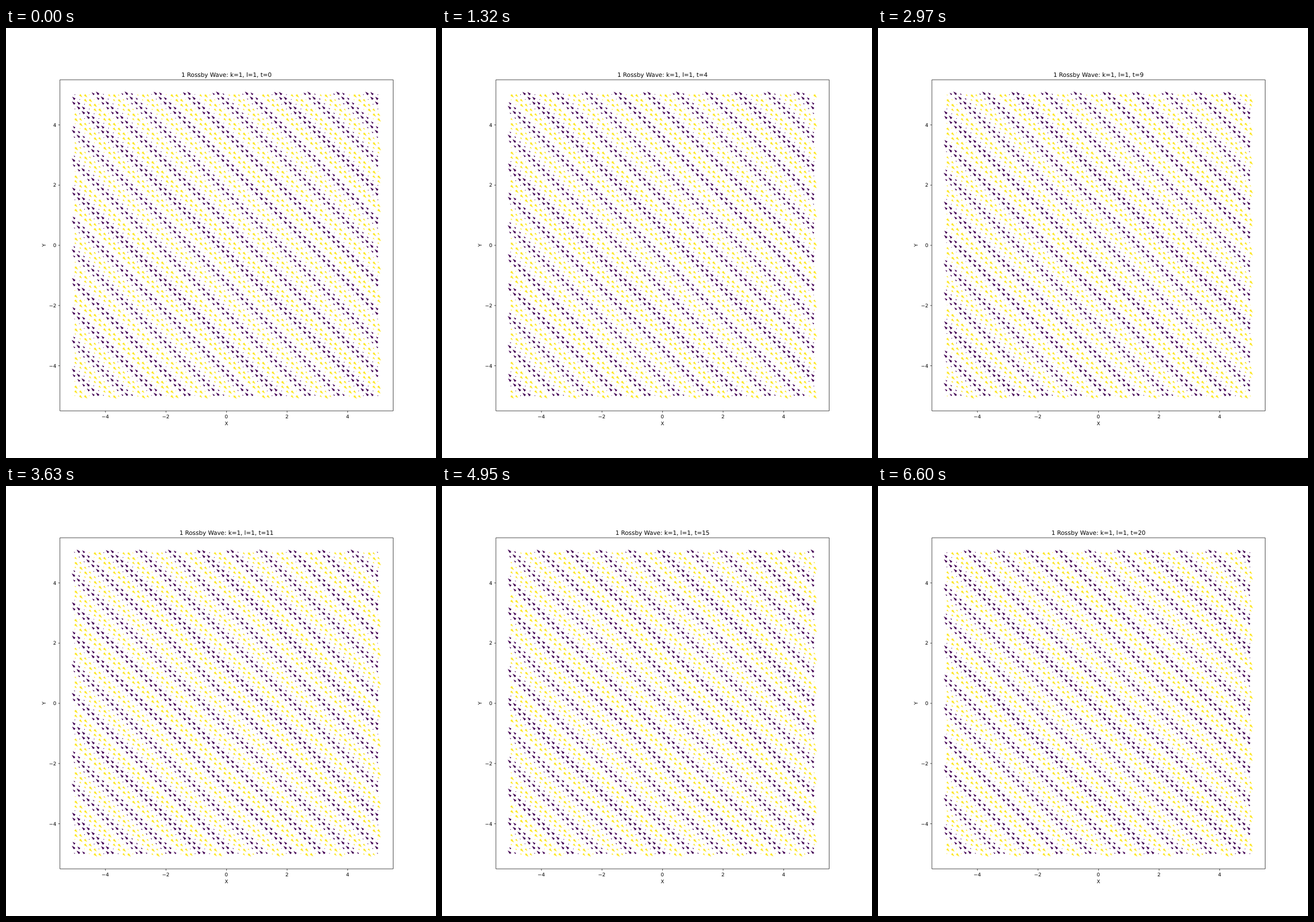
An HTML page for the animation above (6930 ms loop, 748x748 px).

```html
<!DOCTYPE html>
<html lang="en">
<head>
<meta charset="utf-8">
<title>Rossby wave</title>
<style>
  html, body { margin: 0; width: 100%; height: 100%; overflow: hidden; background: #fff; }
  svg { display: block; width: 100vw; height: 100vh; }
  text { font-family: "DejaVu Sans", sans-serif; font-size: 8.66px; text-anchor: middle; text-rendering: geometricPrecision; }
  #title { font-size: 10.39px; }
  #axes { fill: none; stroke: #000; stroke-width: .69; }
</style>
</head>
<body>
<svg viewBox="0 0 748 748">
  <path id="yellow" fill="#fde725"/>
  <path id="purple" fill="#440154"/>
  <path id="axes"/>
  <g id="labels"></g>
  <text x="383.5" y="691">X</text>
  <text transform="translate(69.1 377.74) rotate(-90)">Y</text>
  <text id="title" x="383.5" y="84.8"></text>
</svg>
<script>
const STEP_MS = 330, STEPS = 21, N = 64;
const LEFT = 93.5, TOP = 89.76, WIDTH = 579.7, HEIGHT = 575.96;
const RIGHT = LEFT + WIDTH, BOTTOM = TOP + HEIGHT;
const MID_X = LEFT + WIDTH / 2, MID_Y = TOP + HEIGHT / 2;
const SHAFT = 0.0024 * WIDTH;                        // arrow shaft width
const MAX_LENGTH = WIDTH / (1.8 * (2 / Math.PI) * N);
const HEAD = 5, HEAD_AXIS = 4.5, HEAD_WIDTH = 3;     // in shaft widths
const PIXEL = 748 / 1200;                            // line grid of the plot

const $ = id => document.getElementById(id);
const px = x => MID_X + x * WIDTH / 11;
const py = y => MID_Y - y * HEIGHT / 11;
const snap = v => (Math.round(v / PIXEL) + 0.5) * PIXEL;
const polygon = points => "M" + points.map(p => p[0].toFixed(2) + " " + p[1].toFixed(2)).join("L") + "Z";

// Outline of an arrow at the origin, pointing down-right for positive speed.
function arrowOutline(speed) {
  const length = Math.abs(speed) * MAX_LENGTH / SHAFT;
  if (length < 1) {
    return Array.from({ length: 6 }, (_, i) => {
      const a = i * Math.PI / 3;
      return [Math.cos(a) * SHAFT / 2, Math.sin(a) * SHAFT / 2];
    });
  }
  const shrink = Math.min(1, length / HEAD);
  const half = [
    [0, 0.5 * shrink],
    [length - HEAD_AXIS * shrink, 0.5 * shrink],
    [length - HEAD * shrink, HEAD_WIDTH / 2 * shrink],
    [length, 0]
  ];
  const mirrored = half.slice(0, 3).reverse().map(([x, y]) => [x, -y]);
  const k = Math.sign(speed) * SHAFT * Math.SQRT1_2;
  return half.concat(mirrored).map(([x, y]) => [(x - y) * k, (x + y) * k]);
}

function drawField(step) {
  const paths = { yellow: "", purple: "" };
  // The wave is constant along every line x + y = const.
  for (let n = 1 - N; n < N; n++) {
    const speed = Math.sin(2 * Math.PI * (n * 10 / (N - 1) + step / 20));
    const outline = arrowOutline(speed);
    const color = speed > 0 ? "yellow" : "purple";
    for (let i = Math.max(0, n); i < Math.min(N, N + n); i++) {
      const j = n + N - 1 - i;
      const x = px(i * 10 / (N - 1) - 5), y = py(j * 10 / (N - 1) - 5);
      paths[color] += polygon(outline.map(p => [x + p[0], y + p[1]]));
    }
  }
  for (const color in paths) $(color).setAttribute("d", paths[color]);
  $("title").textContent = `1 Rossby Wave: k=1, l=1, t=${step}`;
}

function drawAxes() {
  let d = `M${snap(LEFT)} ${snap(TOP)}H${snap(RIGHT)}V${snap(BOTTOM)}H${snap(LEFT)}Z`, labels = "";
  for (let v = -4; v <= 4; v += 2) {
    const label = String(v).replace("-", "\u2212");
    d += `M${snap(px(v))} ${snap(BOTTOM)}v3.03M${snap(LEFT)} ${snap(py(v))}h-3.03`;
    labels += `<text x="${px(v)}" y="679">${label}</text>`
      + `<text x="87.4" y="${py(v) + 3.4}" style="text-anchor:end">${label}</text>`;
  }
  $("axes").setAttribute("d", d);
  $("labels").innerHTML = labels;
}

let shown = -1;
function render() {
  const step = Math.floor(performance.now() / STEP_MS) % STEPS;
  if (step !== shown) drawField(shown = step);
  requestAnimationFrame(render);
}

drawAxes();
render();
</script>
</body>
</html>
```
